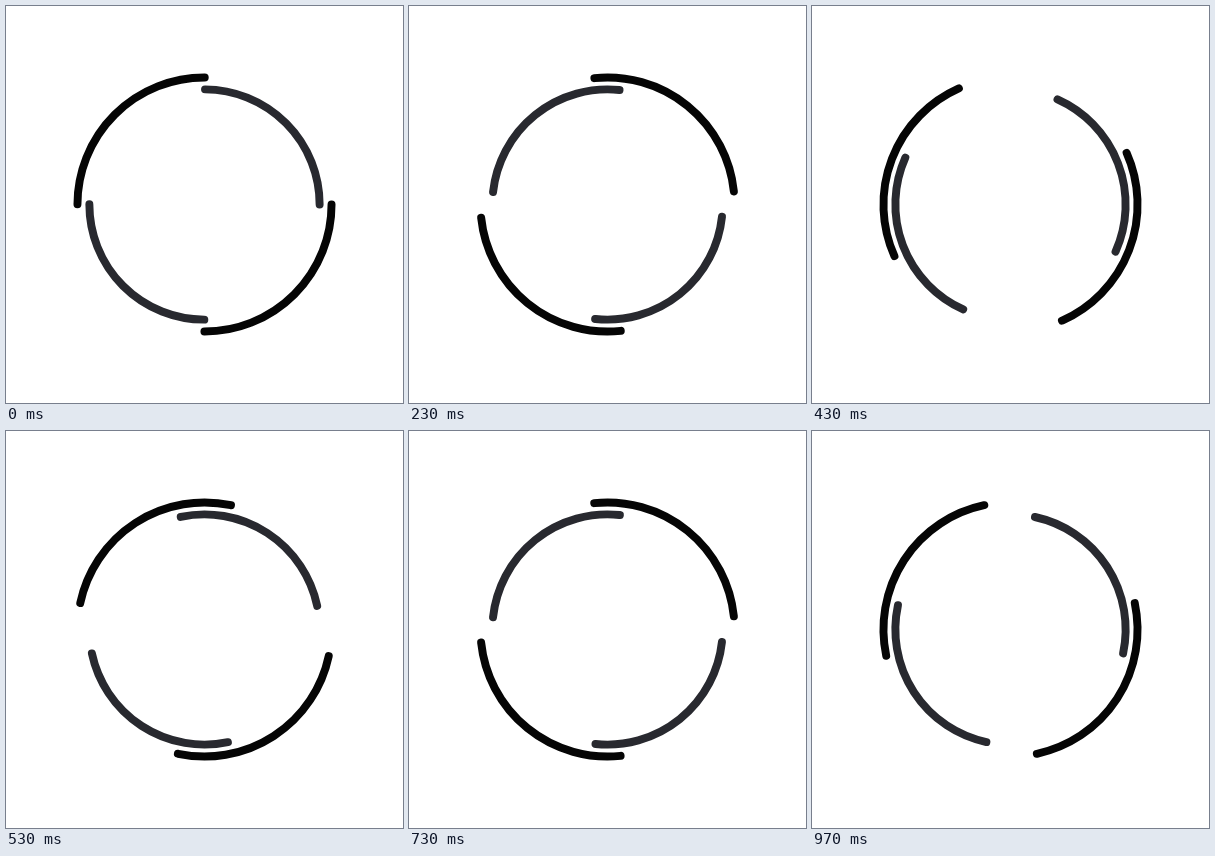
Animation of 397x397 px, one loop 1 s. Source, as an HTML page:

```html
<!DOCTYPE html>
<html lang="en">
<head>
<meta charset="utf-8">
<title>Double ring loader</title>
<style>
  html, body { margin: 0; width: 100%; height: 100%; overflow: hidden; background: #fff; }
  svg { display: block; width: 100%; height: 100%; }
  circle { fill: none; stroke-width: 2; stroke-linecap: round; }
</style>
</head>
<body>
<svg viewBox="0 0 100 100">
  <circle id="outer" cx="50" cy="50" r="32" stroke="#050505"/>
  <circle id="inner" cx="50" cy="50" r="29" stroke="#28292f"/>
</svg>
<script>
  const LOOP = 1000;
  const STEPS = 30;
  const outer = document.getElementById('outer');
  const inner = document.getElementById('inner');

  // Two opposite quarter arcs per ring
  function dash(ring, startsWithGap) {
    const quarter = Math.PI * ring.r.baseVal.value / 2;
    ring.setAttribute('stroke-dasharray', `${quarter} ${quarter}`);
    ring.setAttribute('stroke-dashoffset', startsWithGap ? quarter : 0);
  }

  function turn(ring, angle) {
    ring.setAttribute('transform', `rotate(${angle} 50 50)`);
  }

  // Thirty steps per turn, each starting on the nearest 10 ms tick
  function stepAt(time) {
    const tick = Math.floor((time % LOOP) / 10);
    return Math.floor(tick * 0.3 + 0.12);
  }

  function draw(time) {
    const angle = stepAt(time) * 360 / STEPS;
    turn(outer, angle);
    turn(inner, -angle);
  }

  function loop() {
    draw(performance.now());
    requestAnimationFrame(loop);
  }

  dash(outer, false);
  dash(inner, true);
  draw(0);
  requestAnimationFrame(loop);
</script>
</body>
</html>
```
